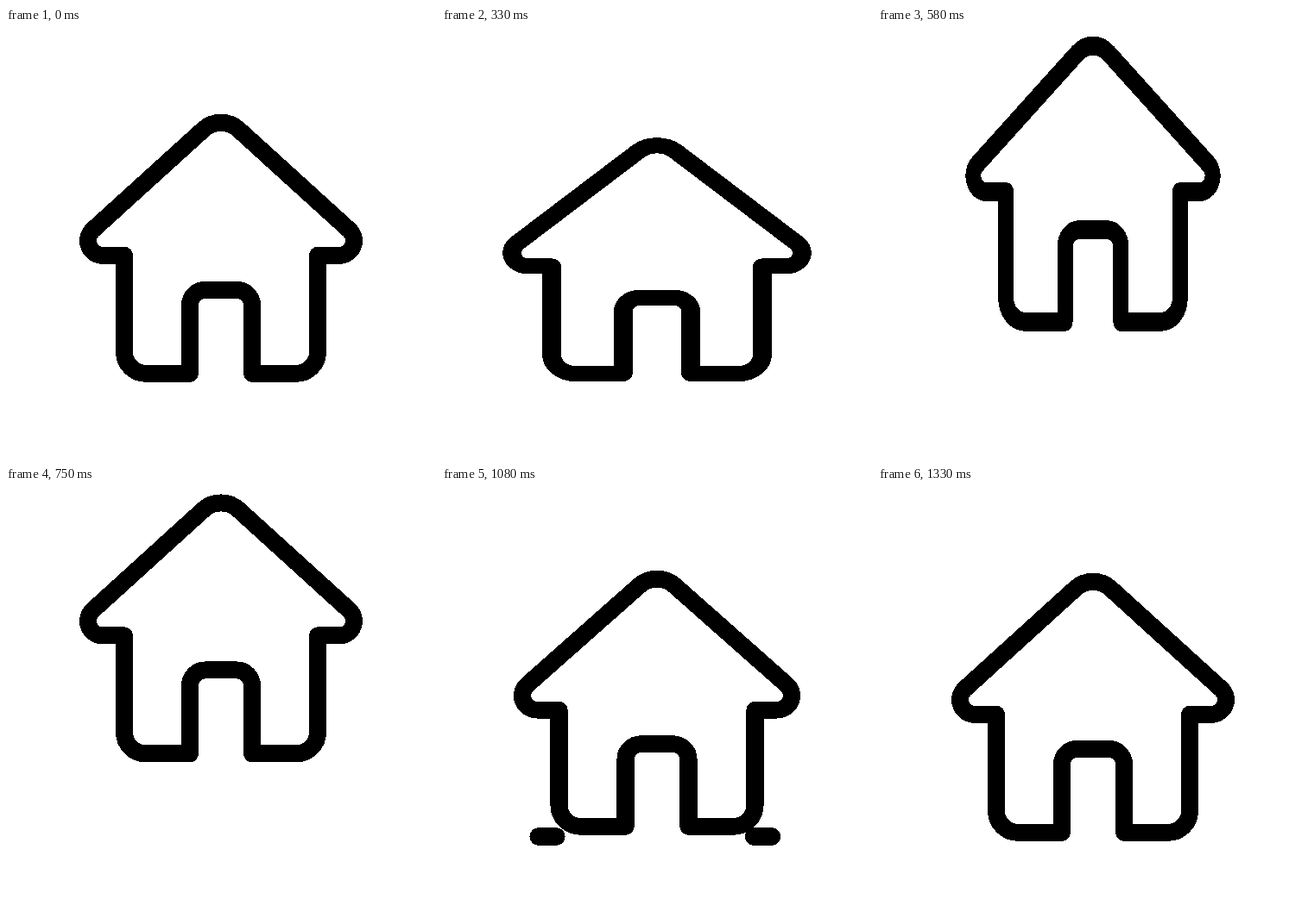
An HTML page for the animation above (1.37 s loop, 498 px wide and 500 px high).

```html
<!DOCTYPE html>
<html lang="en">
<head>
<meta charset="utf-8">
<title>Jumping house</title>
<style>
  html, body { margin: 0; width: 100%; height: 100%; overflow: hidden; background: #fff; }
  svg { display: block; width: 100vw; height: 100vh; }
  path {
    fill: none; stroke: #000; stroke-width: 20;
    stroke-linejoin: round; stroke-linecap: round; shape-rendering: crispEdges;
  }
  .dust { stroke-width: 20.8; }
</style>
</head>
<body>
<svg viewBox="0 0 498 500">
  <path id="house" d="M137 264 H112 A17 17 0 0 1 100.6 234.4 L228.8 117.8
    A30 30 0 0 1 269.2 117.8 L397.4 234.4 A17 17 0 0 1 386 264 H361
    V376 A25 25 0 0 1 336 401 H285 V322 A18 18 0 0 0 267 304 H231
    A18 18 0 0 0 213 322 V401 H162 A25 25 0 0 1 137 376 Z"/>
  <path id="left" class="dust"/>
  <path id="right" class="dust"/>
</svg>
<script>
const LOOP = 1370, FPS = 24, CX = 249, CY = 255.5;
const $ = id => document.getElementById(id);
const house = $('house'), left = $('left'), right = $('right');

// [step, squash, vertical offset]
const KEYS = [
  [0, 0, -0.2], [4, -0.027, -3.1], [9, 0.104, 15], [14, -0.1, -74.7],
  [18, 0, -91.6], [23, 0.201, 29], [27.5, -0.053, -17.2], [31, 0.024, 3.5], [32, 0, -0.2]
];

function ease(x) {
  x = Math.min(1, Math.max(0, x));
  return x * x * (3 - 2 * x);
}

function pose(n) {
  let i = 0;
  while (i < KEYS.length - 2 && n >= KEYS[i + 1][0]) i++;
  const a = KEYS[i], b = KEYS[i + 1];
  const e = ease((n - a[0]) / (b[0] - a[0]));
  return [1, 2].map(j => a[j] + (b[j] - a[j]) * e);
}

// The motion advances 24 times a second, on whole hundredths
const startOf = n => Math.round(n * 100 / FPS) * 10;
function stepAt(t) {
  const n = Math.floor(t * FPS / 1000) + 1;
  return Math.min(32, startOf(n) <= t ? n : n - 1);
}

function drawDust(el, x, dir, n) {
  const tip = x + dir * 50 * ease((n - 22) / 7);
  const tail = x + dir * 50 * ease((n - 24) / 7);
  el.setAttribute('d', n >= 22 && n < 31 ? `M${tail} 405.5 L${tip} 405.5` : '');
}

function draw(t) {
  const n = stepAt(t), [k, y] = pose(n);
  house.setAttribute('transform',
    `translate(${CX} ${CY + y}) scale(${1 + k} ${1 - k}) translate(${-CX} ${-CY})`);
  drawDust(left, 142.2, -1, n);
  drawDust(right, 351.4, 1, n);
}

const t0 = performance.now();
function tick() {
  draw((performance.now() - t0) % LOOP);
  requestAnimationFrame(tick);
}
tick();
</script>
</body>
</html>
```
